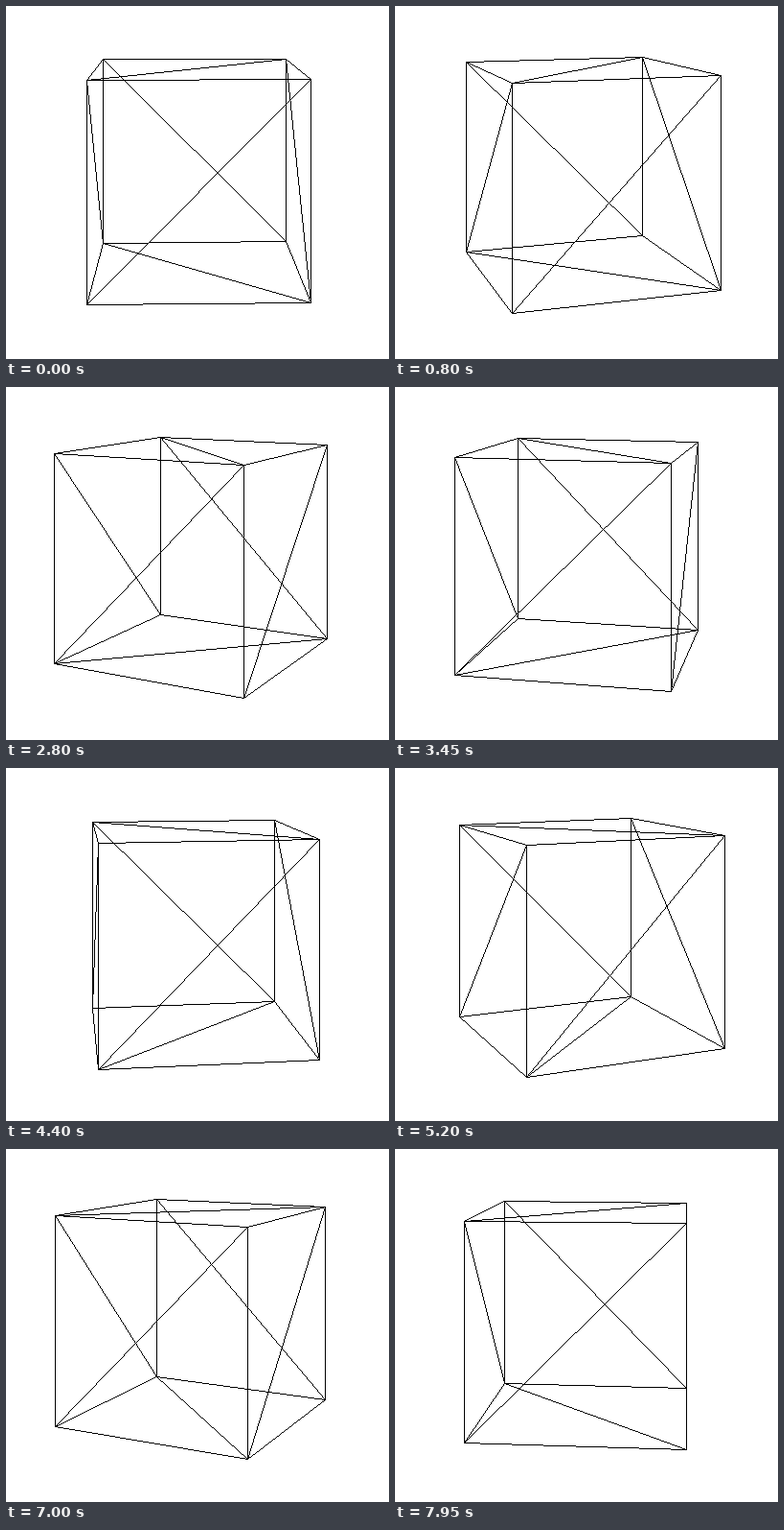
Write an HTML page with a canvas that moves like this. It is 400 by 368 pixels and loops after 8 s.

```html
<!DOCTYPE html>
<html lang="en">
<head>
<meta charset="utf-8">
<title>Rotating wireframe cube</title>
<style>
  html, body { margin: 0; width: 100%; height: 100%; overflow: hidden; background: #fff; }
  canvas { display: block; }
</style>
</head>
<body>
<canvas id="stage" width="400" height="368"></canvas>
<script>
const ctx = document.getElementById('stage').getContext('2d');
const LOOP = 8000, STEP = 50;
const CENTER_X = 199, HORIZON = -40, FOCAL = 1050.3, DISTANCE = 5;
const RADIUS = Math.SQRT1_2;

// [time in ms, turn in degrees]; the spin is slightly uneven
const TURNS = [
  [0, 1.35], [800, 18.4], [2100, 46.9], [2600, 57], [3450, 77.1], [4400, 97.35],
  [5100, 111.6], [6050, 133.1], [6850, 150.1], [7700, 168.4], [7950, 174.35]
];

function turnAt(time) {
  const i = Math.max(1, TURNS.findIndex(([t]) => t >= time));
  const [t0, a0] = TURNS[i - 1], [t1, a1] = TURNS[i];
  return a0 + (a1 - a0) * (time - t0) / (t1 - t0);
}

// Corners run around the vertical axis; level 0.5 is the top, 1.5 the bottom
function project(corner, level, turn) {
  const angle = (corner * 90 - 45 + turn) * Math.PI / 180;
  const scale = FOCAL / (DISTANCE - RADIUS * Math.cos(angle));
  return [
    Math.floor(CENTER_X + scale * RADIUS * Math.sin(angle)),
    Math.floor(HORIZON + scale * level)
  ];
}

// One-pixel line without smoothing
function line([x0, y0], [x1, y1]) {
  const dx = Math.abs(x1 - x0), dy = Math.abs(y1 - y0);
  const sx = Math.sign(x1 - x0), sy = Math.sign(y1 - y0);
  let error = dx - dy;
  for (;;) {
    ctx.fillRect(x0, y0, 1, 1);
    if (x0 === x1 && y0 === y1) return;
    const twice = 2 * error;
    if (twice > -dy) { error -= dy; x0 += sx; }
    if (twice < dx) { error += dx; y0 += sy; }
  }
}

function draw(time) {
  const turn = turnAt(time);
  const corners = [0, 1, 2, 3];
  const top = corners.map(c => project(c, 0.5, turn));
  const bottom = corners.map(c => project(c, 1.5, turn));

  ctx.fillStyle = '#fff';
  ctx.fillRect(0, 0, 400, 368);
  ctx.fillStyle = '#000';
  for (const c of corners) {
    const next = (c + 1) % 4;
    line(top[c], top[next]);
    line(bottom[c], bottom[next]);
    line(top[c], bottom[c]);
    line(top[next], bottom[c]);
  }
  line(top[0], top[2]);
  line(bottom[1], bottom[3]);
}

const start = performance.now();
function tick() {
  const time = (performance.now() - start) % LOOP;
  draw(Math.floor(time / STEP) * STEP);
  requestAnimationFrame(tick);
}
tick();
</script>
</body>
</html>
```
